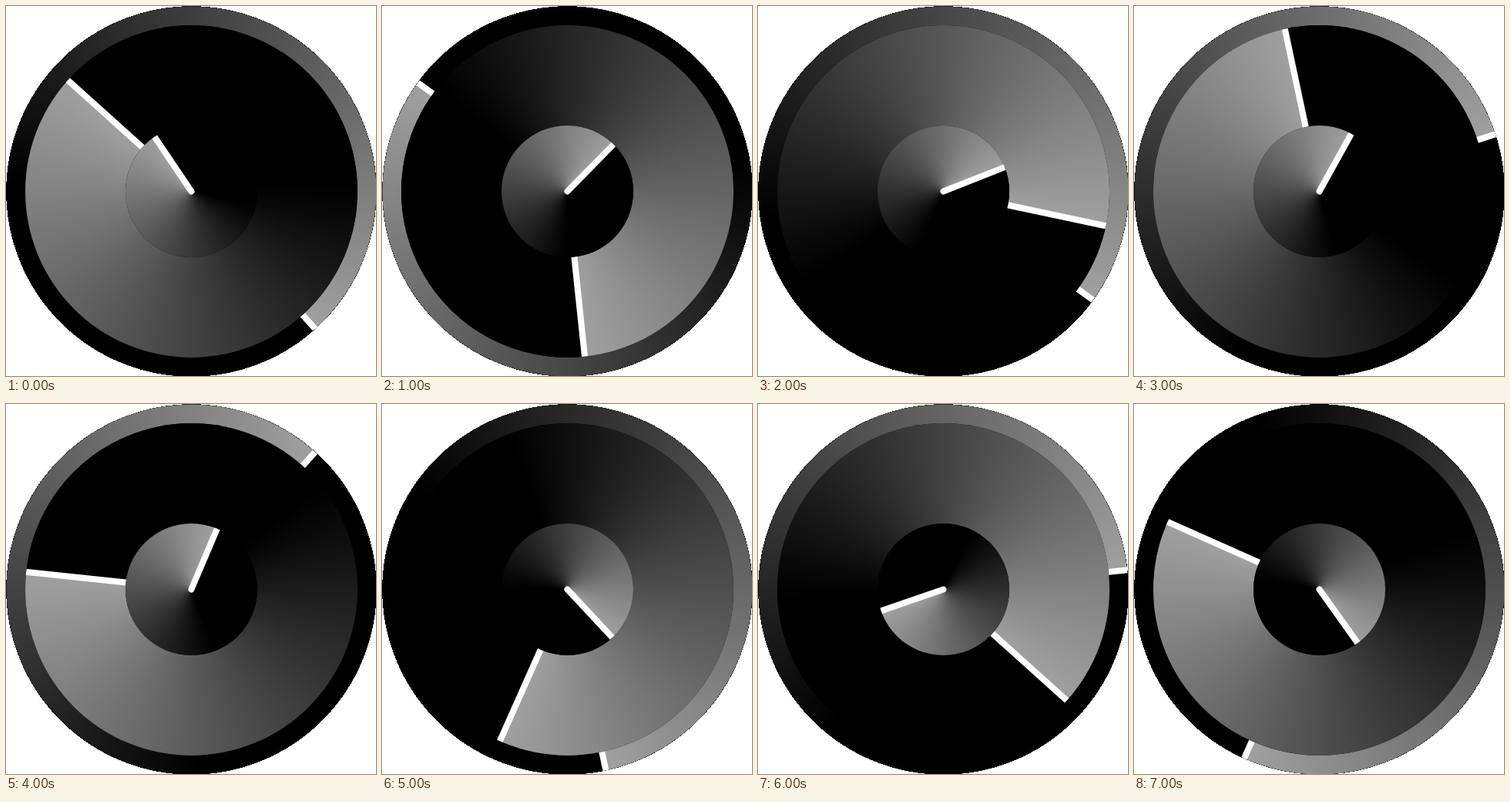
Write an HTML page with a canvas that moves like this. It is 480 by 480 pixels and loops after 8 s.

```html
<!DOCTYPE html>
<html lang="en">
<head>
<meta charset="utf-8">
<title>Gradient clock</title>
<style>
  html, body { margin: 0; width: 100%; height: 100%; overflow: hidden; background: #fff; }
  canvas { display: block; }
</style>
</head>
<body>
<canvas id="stage" width="480" height="480"></canvas>
<script>
const ctx = document.getElementById('stage').getContext('2d');
const SIZE = 480;
const CENTER = 240.5;
const STEP = 1000;

// One clock reading per second: hours, minutes, seconds
const TIMES = [
  [10, 52, 23], [1, 29, 51], [2, 17, 21], [12, 58, 12],
  [12, 46, 7], [4, 34, 28], [8, 22, 14], [4, 49, 34]
];

function drawDial(radius, degrees) {
  const angle = (degrees - 90) * Math.PI / 180;
  const shade = ctx.createConicGradient(angle, 0, 0);
  shade.addColorStop(0, '#000');
  shade.addColorStop(0.375, '#000');
  shade.addColorStop(1, '#a0a0a0');

  ctx.save();
  ctx.translate(CENTER, CENTER);
  ctx.beginPath();
  ctx.arc(0, 0, radius, 0, Math.PI * 2);
  // The black base leaves a thin dark rim
  for (const fill of ['#000', shade]) {
    ctx.fillStyle = fill;
    ctx.fill();
  }
  ctx.clip();

  ctx.rotate(angle);
  ctx.beginPath();
  ctx.moveTo(0, 0);
  ctx.lineTo(radius + 8, 0);
  ctx.strokeStyle = '#fff';
  ctx.lineWidth = 8;
  ctx.lineCap = 'round';
  ctx.stroke();
  ctx.restore();
}

// Cuts the clock out row by row, so its outline stays hard-edged
function maskOutside(radius) {
  ctx.fillStyle = '#fff';
  for (let y = 0; y < SIZE; y++) {
    const half = Math.sqrt(Math.max(0, radius ** 2 - (y + 0.5 - CENTER) ** 2));
    const right = Math.round(CENTER + half);
    ctx.fillRect(0, y, Math.round(CENTER - half), 1);
    ctx.fillRect(right, y, SIZE - right, 1);
  }
}

function drawClock([hours, minutes, seconds]) {
  ctx.fillStyle = '#000';
  ctx.fillRect(0, 0, SIZE, SIZE);
  drawDial(240, seconds * 6);
  drawDial(215.5, minutes * 6);
  drawDial(85.5, hours * 30 + minutes / 2);
  maskOutside(240.3);
}

let start;
function tick(now) {
  start ??= now;
  drawClock(TIMES[Math.floor((now - start) / STEP) % TIMES.length]);
  requestAnimationFrame(tick);
}
drawClock(TIMES[0]);
requestAnimationFrame(tick);
</script>
</body>
</html>
```
